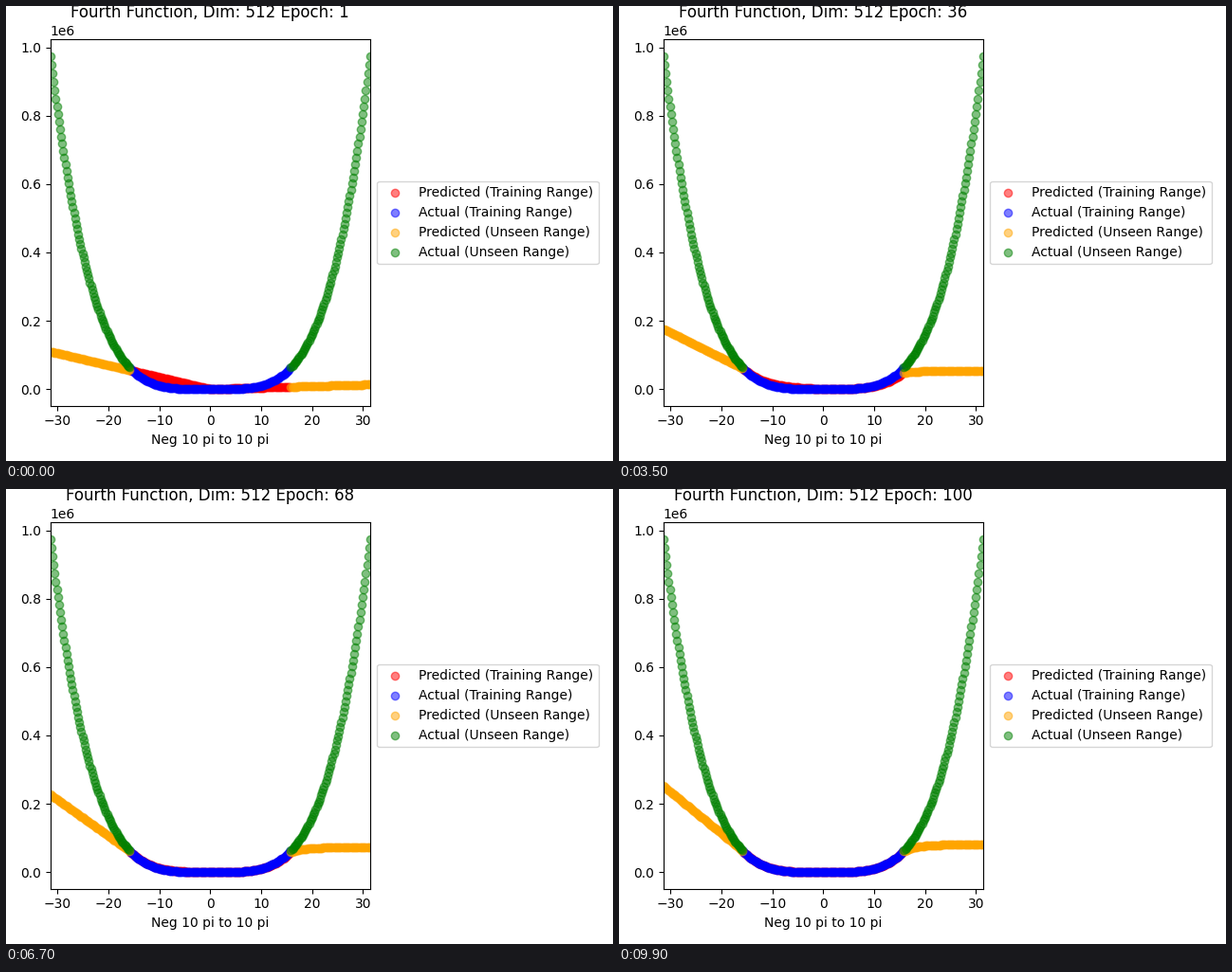
Animation of 640 by 480 pixels, one loop 10 s. Source, as a matplotlib script:

```python
import numpy as np
import matplotlib.pyplot as plt
from matplotlib.animation import FuncAnimation

W, H, DPI = 640, 480, 100
EPOCHS = 100
LIMIT = 10 * np.pi
EDGE = 5 * np.pi
EDGE_Y = EDGE ** 4

x = np.linspace(-LIMIT, LIMIT, 300)
actual = x ** 4
seen = np.abs(x) <= EDGE
beyond = np.clip(np.abs(x) - EDGE, 0, None)  # distance outside the training range

# The untrained network is two straight lines meeting at zero
untrained = np.where(x < 0, -3500 * x, 430 * x)


def predict(epoch):
    """Blend from the untrained lines to the learned curve."""
    p = (epoch - 1) / (EPOCHS - 1)
    ease = p * p * (3 - 2 * p)
    rise = (175e3 + 80e3 * ease - EDGE_Y) * beyond / EDGE
    plateau = (1e3 + 20e3 * ease) * (1 - np.exp(-beyond / 2.5))
    outside = EDGE_Y + np.where(x < 0, rise, plateau)
    learned = np.where(seen, actual, outside)
    w = np.exp(-(epoch - 1) / 25)
    return w * untrained + (1 - w) * learned


fig = plt.figure(figsize=(W / DPI, H / DPI), dpi=DPI)
left, bottom, right, top = 46.75, 58.28, 383.9, 444.67
ax = fig.add_axes([left / W, bottom / H, (right - left) / W, (top - bottom) / H])


def dots(mask, y, color, label):
    return ax.scatter(x[mask], y[mask], color=color, alpha=0.5, label=label)


start = predict(1)
fit_seen = dots(seen, start, "red", "Predicted (Training Range)")
dots(seen, actual, "blue", "Actual (Training Range)")
fit_unseen = dots(~seen, start, "orange", "Predicted (Unseen Range)")
dots(~seen, actual, "green", "Actual (Unseen Range)")

ax.set_xlim(-LIMIT, LIMIT)
ax.set_ylim(-0.05 * LIMIT ** 4, 1.05 * LIMIT ** 4)
ax.set_xlabel("Neg 10 pi to 10 pi")
ax.legend(loc="center left", bbox_to_anchor=(1, 0.5))
title = ax.set_title("Fourth Function, Dim: 512 Epoch: 1")


def update(frame):
    epoch = frame + 1
    y = predict(epoch)
    fit_seen.set_offsets(np.c_[x[seen], y[seen]])
    fit_unseen.set_offsets(np.c_[x[~seen], y[~seen]])
    title.set_text(f"Fourth Function, Dim: 512 Epoch: {epoch}")
    return fit_seen, fit_unseen, title


anim = FuncAnimation(fig, update, frames=EPOCHS, interval=100,
                     init_func=lambda: update(0), repeat=True, repeat_delay=0)
plt.show()
```
